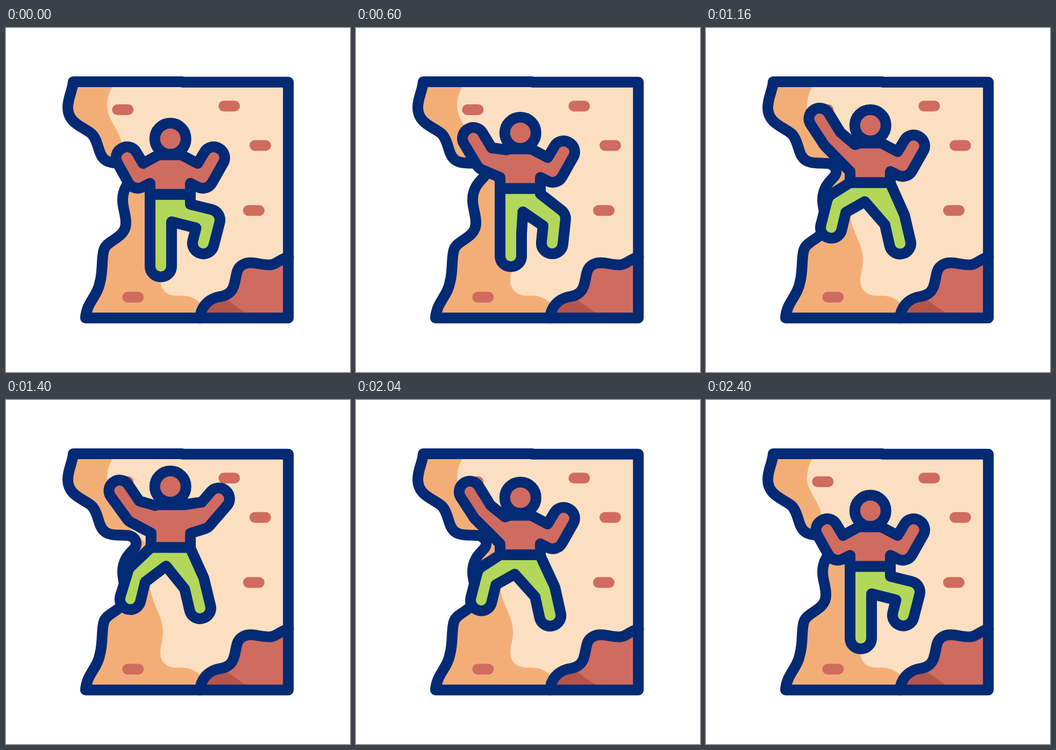
An HTML page for the animation above (2800 ms loop, 640 px wide and 640 px high).

```html
<!DOCTYPE html>
<html lang="en">
<head>
<meta charset="utf-8">
<title>Climber</title>
<style>
  html, body { margin: 0; width: 100%; height: 100%; overflow: hidden; background: #fff; }
  svg { display: block; width: 100%; height: 100%; }
  .line { stroke: #032a75; stroke-width: 20; stroke-linecap: round; stroke-linejoin: round; }
  .red { fill: #d06b60; }
</style>
</head>
<body>
<svg viewBox="0 0 640 640">
  <defs>
    <path id="wall" d="M125 100C124 116 115 130 115 148C115 178 145 184 159.500 197C174 212 170 238 187 247C200 254 221 250 231 253C243 257 245 269 238 277C231 285 217 296 217 320C217 336 223 345 223 363C223 390 190 394 183 410.500C177 424 181 450 175 472C170 500 150 510 148 539.500H525.300V100.800H328V100Z"/>
    <clipPath id="inside"><use href="#wall"/></clipPath>
    <rect id="hold" class="red" x="-20" y="-10" width="40" height="20" rx="10"/>
  </defs>
  <g clip-path="url(#inside)">
    <use href="#wall" fill="#fbdfc0"/>
    <path fill="#f3ae78" d="M100 90H207C199 110 188 120 188 147C190 173 212 190 215 215C222 245 262 250 264 285L267 345C272 382 292 400 292 432C292 450 287 456 287 470C288 490 302 499 322 498C345 497 356 505 370 520V550H100Z"/>
  </g>
  <use href="#hold" x="217.300" y="152"/>
  <use href="#hold" x="415.300" y="145.300"/>
  <use href="#hold" x="473" y="218.500"/>
  <use href="#hold" x="461" y="339.500"/>
  <use href="#hold" x="236.300" y="500.700"/>
  <path class="red" d="M361 539.500C362 520 375 506 392 501C410 498 418 494 423 482C430 463 426 448 441 440C458 431 478 444 495 440C506 437 514 428 525.500 426V539.500Z"/>
  <path fill="#b3554c" d="M361 539.500L390 504L412 506Q428 518 446 530V539.500Z"/>
  <path class="line" fill="none" d="M361 539.500C362 520 375 506 392 501C410 498 418 494 423 482C430 463 426 448 441 440C458 431 478 444 495 440C506 437 514 428 525.500 426"/>
  <use href="#wall" class="line" fill="none"/>
  <path id="legs" class="line" fill="#b3d75b"/>
  <path id="torso" class="line red"/>
  <circle id="head" class="line red" r="29"/>
</svg>
<script>
const LOOP = 2800, STEP = 40, PHASE = 400, LIMB = 20;

const TORSO = ["neckL", "collarL", "crookL", "handL", "elbowL", "pitL", "waistL",
               "waistR", "pitR", "elbowR", "handR", "crookR", "neckR"];
const LEGS = ["waistL", "kneeOutL", "footL", "kneeInL", "crotch",
              "kneeInR", "footR", "kneeOutR", "hipR", "waistR"];

const rest = {
  head: [305.8, 206],
  neckL: [286, 236], collarL: [283, 236.5], crookL: [255, 252], handL: [225, 241.5],
  elbowL: [237, 304.5], pitL: [268, 289], waistL: [268, 309.5],
  waistR: [343, 309.5], pitR: [343, 289], elbowR: [374, 304.5],
  handR: [386.5, 241.5], crookR: [356.5, 252], neckR: [326, 236],
  kneeOutL: [268, 400], footL: [288, 443], kneeInL: [308, 400], crotch: [308, 360.5],
  kneeInR: [353.5, 372], footR: [367, 400], kneeOutR: [402.5, 342.5], hipR: [343, 328]
};

const raised = {};
for (const name of ["head", ...TORSO]) raised[name] = [rest[name][0], rest[name][1] - 22];

// Left hand reaches up and the body rises.
const reachLeft = {
  ...rest, ...raised,
  collarL: [277, 217], crookL: [250, 194], handL: [211.5, 169], elbowL: [220, 218],
  kneeOutL: [268, 360.5], footL: [288, 405], kneeInL: [308, 366], crotch: [313, 323.5],
  kneeInR: [342.5, 364], footR: [363, 400], kneeOutR: [379.5, 349.5], hipR: [343, 289]
};

// Left foot steps onto the wall.
const stepLeft = {
  ...reachLeft,
  head: [305.8, 181], kneeOutL: [226, 312], footL: [231.5, 370], kneeInL: [259, 342],
  crotch: [295, 323], kneeInR: [332.5, 366], footR: [361, 400.5], kneeOutR: [369, 348]
};

// Right hand reaches up and the body rises again.
const reachRight = {
  ...stepLeft,
  head: [305.8, 141],
  neckL: [286, 175], collarL: [277, 175.5], crookL: [246, 182], elbowL: [236.5, 233],
  pitL: [272, 228], waistL: [271, 261], waistR: [343, 261], pitR: [343.5, 229],
  elbowR: [377, 193], handR: [405, 148], crookR: [372, 150], neckR: [336, 175.5],
  kneeOutL: [231, 315], kneeInL: [259, 335], crotch: [301, 295],
  kneeInR: [332, 337], footR: [361, 373], kneeOutR: [367, 314], hipR: [343, 262]
};

const keys = [rest, rest, reachLeft, stepLeft, reachRight, stepLeft, rest, rest];
const ease = u => u * u * (3 - 2 * u);
const mix = (a, b, u) => a.map((v, i) => v + (b[i] - v) * u);

function poseAt(t) {
  const i = Math.floor(t / PHASE), u = ease(t / PHASE - i), pose = {};
  for (const name in rest) pose[name] = mix(keys[i][name], keys[i + 1][name], u);
  return pose;
}

// Two square corners around the end of a limb, later rounded into a cap.
function tip(end, before, after) {
  const [mx, my] = mix(before, after, 0.5);
  let dx = end[0] - mx, dy = end[1] - my;
  const k = LIMB / Math.hypot(dx, dy);
  dx *= k; dy *= k;
  const side = Math.sign((before[0] - end[0]) * -dy + (before[1] - end[1]) * dx);
  return [side, -side].map(s => [end[0] + dx - s * dy, end[1] + dy + s * dx, LIMB - 0.5]);
}

function outline(pose, names) {
  const near = i => pose[names[(i + names.length) % names.length]];
  const points = names.flatMap((name, i) =>
    /^(hand|foot)/.test(name) ? tip(near(i), near(i - 1), near(i + 1))
      : [[...near(i), /^(elbow|kneeOut)/.test(name) ? LIMB : 0]]);
  return "M" + points.map((p, i) => corner(points.at(i - 1), p, points[(i + 1) % points.length])).join("L") + "Z";
}

function corner(a, p, b) {
  const [x, y, r] = p;
  if (!r) return `${x} ${y}`;
  const toA = Math.hypot(a[0] - x, a[1] - y), toB = Math.hypot(b[0] - x, b[1] - y);
  const ax = (a[0] - x) / toA, ay = (a[1] - y) / toA;
  const bx = (b[0] - x) / toB, by = (b[1] - y) / toB;
  const angle = Math.acos(Math.max(-1, Math.min(1, ax * bx + ay * by)));
  const cut = Math.min(r / Math.tan(angle / 2), toA, toB);
  const radius = cut * Math.tan(angle / 2);
  const sweep = ax * by - ay * bx < 0 ? 1 : 0;
  return `${x + ax * cut} ${y + ay * cut}A${radius} ${radius} 0 0 ${sweep} ${x + bx * cut} ${y + by * cut}`;
}

const [legs, torso, head] = ["legs", "torso", "head"].map(id => document.getElementById(id));

function draw() {
  const pose = poseAt(Math.floor(performance.now() / STEP) * STEP % LOOP);
  legs.setAttribute("d", outline(pose, LEGS));
  torso.setAttribute("d", outline(pose, TORSO));
  head.setAttribute("cx", pose.head[0]);
  head.setAttribute("cy", pose.head[1]);
  requestAnimationFrame(draw);
}
draw();
</script>
</body>
</html>
```
